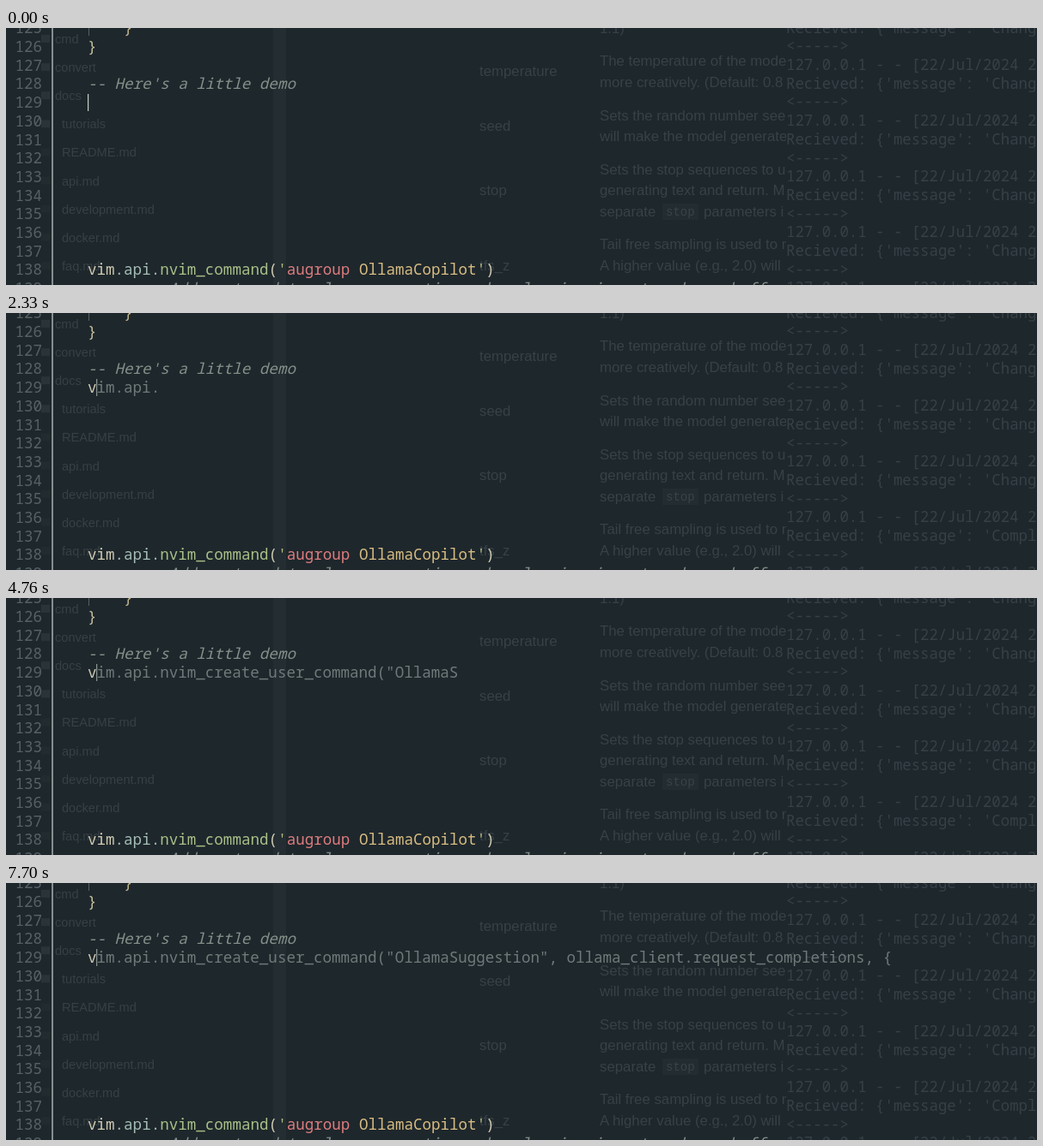
These frames come from a looping animation (1200 px wide and 300 px high, 8000 ms). An HTML page:

```html
<!DOCTYPE html>
<html lang="en">
<head>
<meta charset="utf-8">
<title>Code completion demo</title>
<style>
  html, body { margin: 0; width: 100%; height: 100%; overflow: hidden; background: #1e272c; }
  svg { display: block; width: 1200px; height: 300px; }
  text { white-space: pre; }
  .code { font: 17.55px "Noto Sans Mono", "DejaVu Sans Mono", monospace; }
  .log { font: 17.35px "Noto Sans Mono", "DejaVu Sans Mono", monospace; fill: #374046; }
  .doc { font: 16.8px "Liberation Sans", Arial, sans-serif; fill: #384146; }
  .tree { font: 14.6px "Liberation Sans", Arial, sans-serif; fill: #374045; }
  .key { font: 14px "Liberation Mono", monospace; fill: #3a4348; }
  .italic { font-style: italic; }
</style>
</head>
<body>
<svg id="stage" viewBox="0 0 1200 300"></svg>
<script>
const stage = document.getElementById("stage");
const LOOP = 8000, LEFT = 95, CHAR = 10.53, LINE = 21.68;

function add(tag, attrs, content = "") {
  const el = document.createElementNS("http://www.w3.org/2000/svg", tag);
  for (const name in attrs) el.setAttribute(name, attrs[name]);
  el.textContent = content;
  return stage.appendChild(el);
}
const rect = (x, y, width, height, fill) => add("rect", { x, y, width, height, fill });
const label = (kind, x, y, content) => add("text", { class: kind, x, y }, content);
const baseline = line => 28.1 + (line - 126) * LINE;
const code = (line, col, content, fill, style = "") =>
  add("text", { class: "code " + style, x: LEFT + col * CHAR, y: baseline(line), fill }, content);

// Windows showing through the editor
rect(311, 0, 15, 300, "#242d32");
["cmd", "convert", "docs", "tutorials", "README.md", "api.md", "development.md", "docker.md", "faq.md"]
  .forEach((name, i) => {
    const y = 13 + i * 33.1;
    rect(41, y - 5, 10, 9, i < 4 ? "#2a3338" : "#222b30");
    label("tree", i < 3 ? 57 : 65, y + 5, name);
  });

[["temperature", 50], ["seed", 114], ["stop", 189], ["tfs_z", 277]]
  .forEach(([name, y]) => label("doc", 551, y + 6, name));
rect(764, 205, 42, 19, "#232c31");
[
  ["1.1)", 0], ["The temperature of the mode", 38], ["more creatively. (Default: 0.8", 63],
  ["Sets the random number see", 102], ["will make the model generate", 126],
  ["Sets the stop sequences to u", 165], ["generating text and return. M", 189],
  ["separate", 214], ["Tail free sampling is used to r", 252], ["A higher value (e.g., 2.0) will", 277]
].forEach(([line, y]) => label("doc", 691, y + 6, line));
label("key", 768, 219, "stop");
label("doc", 812, 220, "parameters i");
rect(908, 0, 292, 300, "#1e272c");

const received = word => "Recieved: {'message': '" + word;
const logLines = ["127.0.0.1 - - [22/Jul/2024 2", received("Chang"), "<----->"];
let lastLog;
for (let k = -2; k < 13; k++) {
  const row = label("log", 908, 49 + k * 21.7, logLines[(k + 3) % 3]);
  if (k === 10) lastLog = row;
}

// Editor
rect(53, 0, 2, 300, "#85908f");
for (let n = 125; n < 140; n++)
  add("text", { class: "code", x: 10.5, y: baseline(n), fill: "#566166" }, n);
rect(96, 0, 1, 9, "#56605f");
code(125, 4, "}", "#c5b98f");
code(126, 0, "}", "#c9c3a0");
code(128, 0, "-- Here's a little demo", "#859089", "italic");
let col = 0;
for (const [part, fill] of [
  ["vim", "#d0cbb2"], [".api.", "#a3bdb5"], ["nvim_command", "#a9c088"], ["(", "#d0cbb2"],
  ["'", "#b5bd80"], ["augroup", "#dd7c7e"], [" OllamaCopilot", "#d8bd82"], ["'", "#b5bd80"], [")", "#d0cbb2"]
]) {
  code(138, col, part, fill);
  col += part.length;
}
code(139, 6, "-- Adds autocmd to clear suggestions when leaving insert mode or buff", "#859089", "italic");

const typed = code(129, 0, "", "#cdc8b0");
const ghost = code(129, 1, "", "#707979");
const cursor = rect(LEFT, 77, 1.2, 20, "#c8cdc6");

// Suggested tokens and the time each one arrives
const tokens = [
  [1670, "im"], [1800, "."], [1930, "a"], [2060, "pi"], [2330, "."],
  [2480, "n"], [2620, "v"], [2760, "im"], [2900, "_"], [3050, "create"], [3190, "_"], [3330, "user"],
  [3390, "_"], [3670, "command"], [3790, '("'], [4090, "O"], [4270, "ll"], [4450, "ama"],
  [4760, "S"], [4850, "uggest"], [5090, "ion"], [5270, '",'], [5440, " o"], [5620, "ll"], [5790, "ama"],
  [6120, "_"], [6270, "client"], [6410, "."], [6560, "request"], [6700, "_"],
  [6970, "com"], [7150, "plet"], [7330, "ions"], [7520, ","], [7700, " {"]
];

function draw(now) {
  const t = now % LOOP;
  const hasTyped = t >= 820;
  typed.textContent = hasTyped ? "v" : "";
  cursor.setAttribute("x", LEFT + (hasTyped ? CHAR - 0.5 : 0));
  cursor.setAttribute("fill", t >= 1670 ? "#8d9693" : "#c8cdc6");
  ghost.textContent = tokens.filter(([at]) => t >= at).map(([, part]) => part).join("");
  lastLog.textContent = received(t >= 1390 ? "Compl" : "Chang");
  requestAnimationFrame(draw);
}
draw(0);
</script>
</body>
</html>
```
